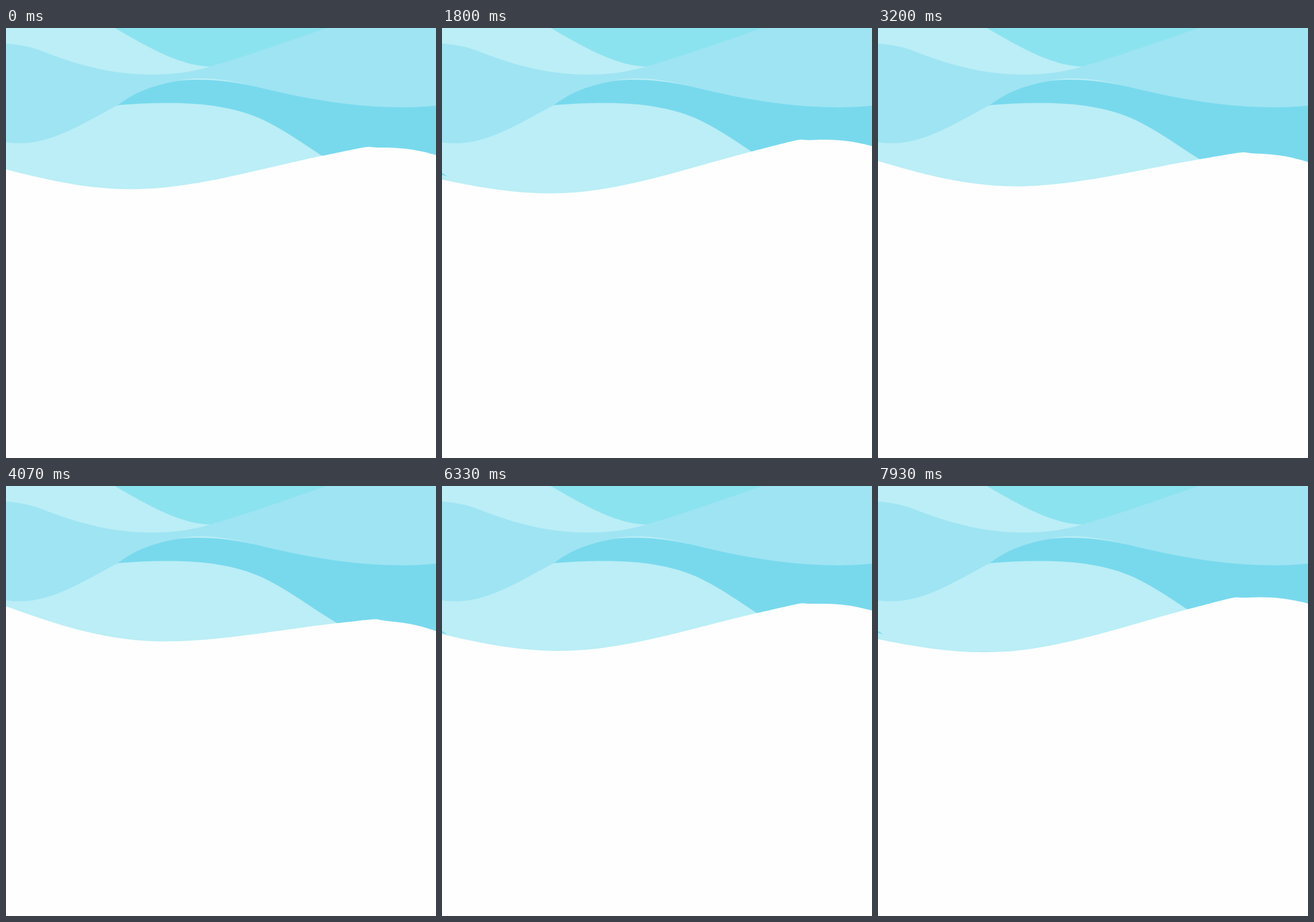
Animation of 748x748 px, one loop 8 s. Source, as an HTML page:

```html
<!DOCTYPE html>
<html lang="en">
<head>
<meta charset="utf-8">
<title>Waves</title>
<style>
  html, body { margin: 0; width: 100%; height: 100%; overflow: hidden; background: #fefefe; }
  svg { display: block; width: 100%; height: 100%; }
</style>
</head>
<body>
<svg viewBox="0 0 748 748">
  <rect width="748" height="330" fill="#78d9ed"/>
  <g fill="#bbeef6">
    <path d="M0 190L195 134.3C230 131.3 255 130.4 285 130.4C350 130.4 400 139.4 440 156.5S525 207 550 222.5L640 278V330H0Z"/>
    <path d="M300 92C311 90.5 322 90 335 90C360 90 395 93 430 101L365 60Z"/>
  </g>
  <path fill="#78d9ed" d="M0 252L9 258L0 255.5Z"/>
  <path fill="#9fe4f3" d="M0 0H748V135Q720 138 690 138C590 138 500 118 430 101C395 92 365 87.5 338 87.5Q318 87.5 300 92C262 98 225 110 195 134C140 162 85 200 25 200.5Q12 200.5 0 199Z"/>
  <path fill="#bbeef6" d="M0 0H200L355 67C322 77 290 81 252 81C190 81 130 66 75 45Q38 29 0 27Z"/>
  <path fill="#8ce3f0" d="M189 0C240 29 300 66 355 67C420 49 490 23 558 0Z"/>
  <path id="wave" fill="#fefefe" d="M-60 230L0 246C70 264 140 280.5 218 280.5C325 280.5 440 245 549 222.5S615 208 655 208S720 213 748 221L810 241V900H-60Z"/>
</svg>
<script>
const LOOP = 8000, STEP = 1000 / 15, CENTER = 374;
const wave = document.getElementById('wave');

// turning points [ms, value]; the wave swings from one to the next
const tilt = [
  [-300, -.01], [900, .06], [1550, -.073], [2300, .036], [2900, .025], [4020, .093],
  [4620, -.052], [5200, -.016], [5800, -.071], [6950, .04], [7550, .04], [8100, -.075]
];
const drift = [
  [0, 0], [1150, 4.1], [1600, -2], [2400, 7], [3300, 0],
  [4040, 1.5], [4350, -4.3], [5000, 0], [6070, 3], [8000, 0]
];

function swing(track, t) {
  const i = track.findIndex(p => p[0] > t);
  const [t0, a] = track[i - 1], [t1, b] = track[i];
  return a + (b - a) * (1 - Math.cos(Math.PI * (t - t0) / (t1 - t0))) / 2;
}

function draw(ms) {
  const t = Math.floor((ms % LOOP + 5) / STEP) * STEP % LOOP;
  const angle = Math.atan(swing(tilt, t)) * 180 / Math.PI;
  wave.setAttribute('transform',
    `translate(0 ${swing(drift, t).toFixed(2)}) rotate(${angle.toFixed(3)} ${CENTER} ${CENTER})`);
}

let start;
function tick(now) {
  start ??= now;
  draw(now - start);
  requestAnimationFrame(tick);
}
draw(0);
requestAnimationFrame(tick);
</script>
</body>
</html>
```
